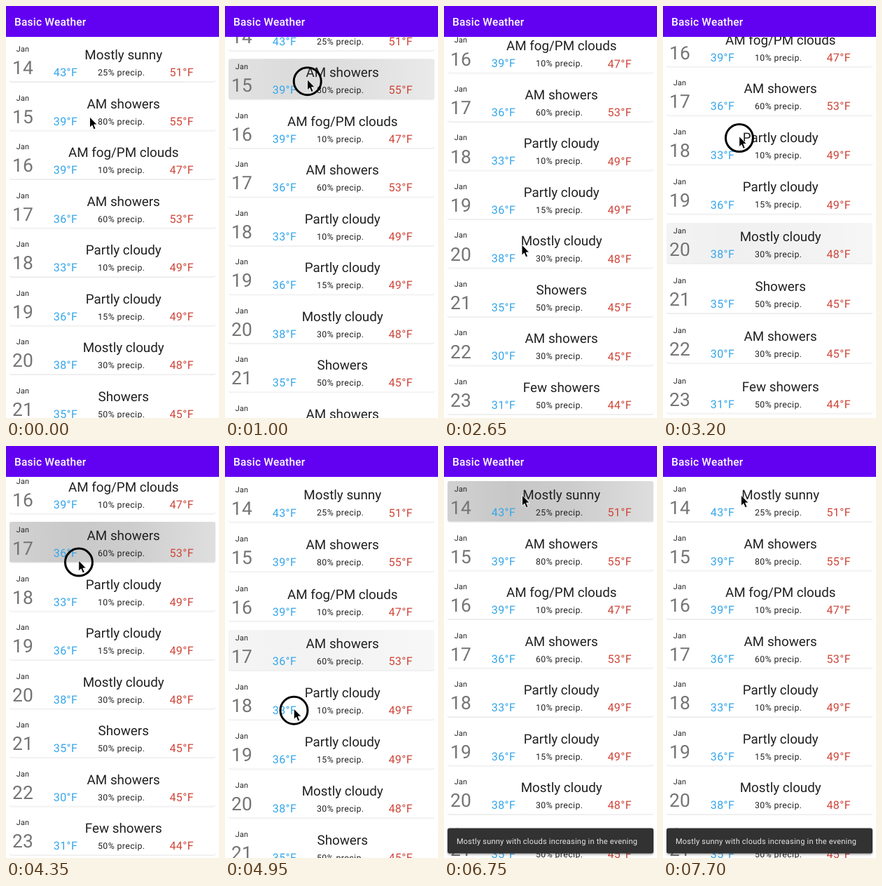
An HTML page that plays this animation: 304 px wide and 587 px high, repeating every 8000 ms.

```html
<!DOCTYPE html>
<html lang="en">
<head>
<meta charset="utf-8">
<title>Basic Weather</title>
<style>
  html, body { margin: 0; width: 100%; height: 100%; overflow: hidden; background: #fff; }
  svg { display: block; width: 100%; height: 100%; font-family: Roboto, sans-serif; text-rendering: geometricPrecision; }
  .month { font-size: 10.8px; letter-spacing: .25px; fill: #222; }
  .day { font-size: 26.4px; letter-spacing: .2px; fill: #757575; }
  .sky { font-size: 18.8px; fill: #212121; }
  .rain { font-size: 12.3px; letter-spacing: .4px; fill: #222; }
  .temp { font-size: 16px; letter-spacing: .4px; }
  .low { fill: #35a6ea; }
  .high { fill: #cf4538; }
  .mid { text-anchor: middle; }
  .bar { font-size: 15.5px; font-weight: 500; letter-spacing: .2px; fill: #fff; }
  .note { font-size: 11px; letter-spacing: .22px; fill: #e6e6e6; }
</style>
</head>
<body>
<svg viewBox="0 0 304 587">
  <defs>
    <linearGradient id="ripple">
      <stop offset="0" stop-opacity=".18"/>
      <stop offset=".3" stop-opacity=".22"/>
      <stop offset=".6" stop-opacity=".2"/>
      <stop offset="1" stop-opacity=".13"/>
    </linearGradient>
    <filter id="lift" x="-5%" y="-10%" width="110%" height="130%">
      <feDropShadow dx="0" dy=".8" stdDeviation=".7" flood-opacity=".22"/>
    </filter>
    <filter id="float" x="-5%" y="-20%" width="110%" height="150%">
      <feDropShadow dx="0" dy="1.5" stdDeviation="1.5" flood-opacity=".35"/>
    </filter>
  </defs>
  <rect width="304" height="587" fill="#fff"/>
  <g id="list"></g>
  <rect width="304" height="44" fill="#6200f2"/>
  <text class="bar" x="12" y="28.2">Basic Weather</text>
  <g id="snack">
    <rect x="5" y="544.5" width="294" height="36" rx="3" fill="#323232" filter="url(#float)"/>
    <text class="note" x="18" y="566.8">Mostly sunny with clouds increasing in the evening</text>
  </g>
  <g id="pointer">
    <path d="M0 0V15.2L3.4 12L5.8 17.8L8.5 16.7L6.1 11H10.7Z" fill="#000" stroke="#fff" stroke-width=".9"/>
    <circle id="ring" cx=".2" cy="2.5" r="19.5" fill="none" stroke="#000" stroke-width="3"/>
  </g>
</svg>
<script>
const LOOP = 8000, PITCH = 69.5, TOP = 44, BOTTOM = 587, MAX = 151.6, SLOP = 9;

// sky, low, chance of rain, high; the first day is Jan 14
const days = [
  ['Mostly sunny', 43, 25, 51], ['AM showers', 39, 80, 55],
  ['AM fog/PM clouds', 39, 10, 47], ['AM showers', 36, 60, 53],
  ['Partly cloudy', 33, 10, 49], ['Partly cloudy', 36, 15, 49],
  ['Mostly cloudy', 38, 30, 48], ['Showers', 35, 50, 45],
  ['AM showers', 30, 30, 45], ['Few showers', 31, 50, 44]
];

// pointer path: time, x, y of the tip
const path = [
  [0, 119.5, 158], [650, 119.5, 158], [1650, 112.5, -30], [2150, 112, -30],
  [2600, 111, 340], [2800, 111, 340], [3300, 108.5, 168], [3750, 108.5, 168],
  [3950, 104, 153], [4250, 104, 153], [5050, 98, 384], [5500, 98, 384],
  [6150, 111.5, 70], [LOOP, 111.5, 70]
];

// from/to: finger down and up; start: scroll position; row: touched card; fade: ripple fading out
const touches = [
  { from: 480, to: 1500, start: 0, row: 1, fade: [800, 1350] },
  { from: 2680, to: 3400, start: MAX, row: 6, fade: [2850, 3330] },
  { from: 4020, to: 5150, start: MAX, row: 3, fade: [4330, 5130] },
  { from: 6300, to: 6450, start: 0, row: 0, fade: [6800, 7350] }
];

const $ = id => document.getElementById(id);
const clamp = (v, a = 0, b = 1) => Math.min(b, Math.max(a, v));
const ramp = (t, a, b) => clamp((t - a) / (b - a));
const smooth = u => u * u * (3 - 2 * u);

const card = ([sky, low, rain, high], i) => `
  <g class="card">
    <rect x="5" width="294" height="57.5" rx="3" fill="#fff" filter="url(#lift)"/>
    <rect class="press" x="5" width="294" height="57.5" rx="3" fill="url(#ripple)" opacity="0"/>
    <text class="month mid" x="24" y="15.1">Jan</text>
    <text class="day mid" x="24" y="47.2">${14 + i}</text>
    <text class="sky mid" x="167.7" y="26">${sky}</text>
    <text class="temp low mid" x="85" y="50.1">${low}°F</text>
    <text class="rain mid" x="164.7" y="49">${rain}% precip.</text>
    <text class="temp high mid" x="250.7" y="50.1">${high}°F</text>
  </g>`;
$('list').innerHTML = days.map(card).join('');
const cards = document.querySelectorAll('.card');
const presses = document.querySelectorAll('.press');

function pointer(t) {
  const i = Math.max(1, path.findIndex(p => p[0] >= t));
  const [a, x, y] = path[i - 1], [b, x2, y2] = path[i];
  const u = smooth(ramp(t, a, b));
  return [x + (x2 - x) * u, y + (y2 - y) * u];
}

// scroll position, which may lie past either end while the list is pulled
function scroll(t) {
  const touch = touches.filter(d => d.from <= t).pop();
  if (!touch) return 0;
  const move = pointer(touch.from)[1] - pointer(Math.min(t, touch.to))[1];
  const raw = touch.start + Math.sign(move) * Math.max(0, Math.abs(move) - SLOP);
  const inside = clamp(raw, 0, MAX);
  if (touch === touches[0]) return inside;
  const spring = 1 - smooth(ramp(t, touch.to, touch.to + 300));
  return inside + (raw - inside) * spring;
}

// cards spread away from the pulled edge, most strongly next to it
function placeCards(raw) {
  const pos = clamp(raw, 0, MAX), pull = pos - raw;
  const reach = Math.sign(pull) * 11.6 * (1 - Math.exp(-Math.abs(pull) / 100));
  const edge = pull < 0 ? BOTTOM : TOP;
  cards.forEach((el, i) => {
    const y = 50 + i * PITCH - pos;
    const far = clamp(Math.abs(y + 19.5 - edge) / (BOTTOM - TOP));
    // the hair of rotation stops text from snapping to whole pixels
    el.setAttribute('transform',
      `translate(0 ${y + reach * (1 - (1 - far) ** 2)}) rotate(.002)`);
  });
}

function draw(t) {
  const [x, y] = pointer(t);
  $('pointer').setAttribute('transform', `translate(${x} ${y})`);
  const down = touches.some(d => t >= d.from && t < d.to);
  $('ring').setAttribute('visibility', down ? 'visible' : 'hidden');

  placeCards(scroll(t));

  for (const { from, row, fade } of touches) {
    const glow = ramp(t, from + 60, from + 200) * (1 - ramp(t, ...fade));
    presses[row].setAttribute('opacity', glow);
  }

  const show = ramp(t, 6470, 6620), size = .8 + .2 * smooth(show);
  $('snack').setAttribute('opacity', show);
  $('snack').setAttribute('transform',
    `translate(152 562.5) scale(${size}) translate(-152 -562.5)`);
}

const begin = performance.now();
function tick() {
  draw((performance.now() - begin) % LOOP);
  requestAnimationFrame(tick);
}
tick();
</script>
</body>
</html>
```
